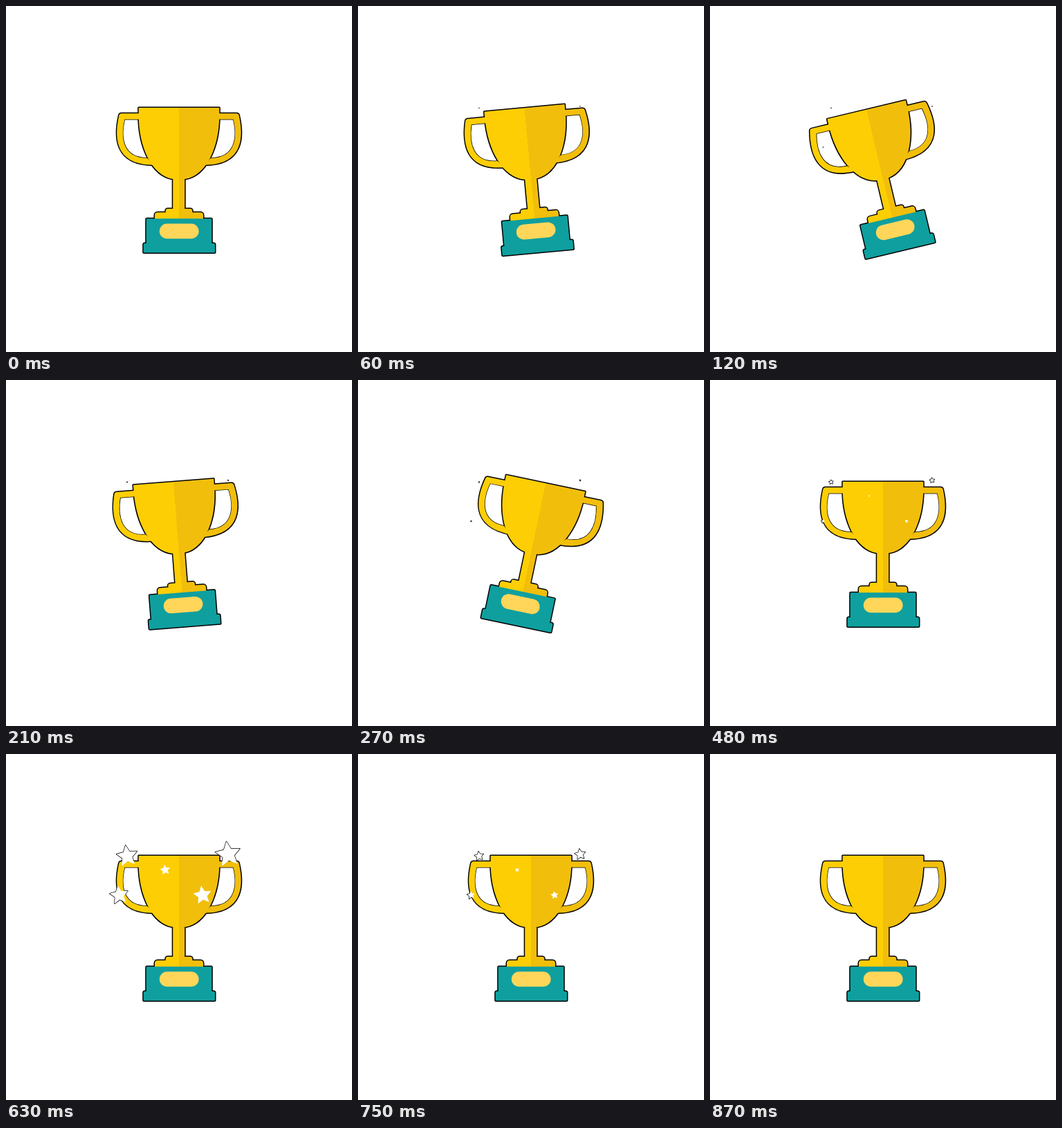
These frames come from a looping animation (500x500 px, 900 ms). An HTML page with a canvas:

```html
<!DOCTYPE html>
<html lang="en">
<head>
<meta charset="utf-8">
<title>Trophy</title>
<style>
  html, body { margin: 0; width: 100%; height: 100%; overflow: hidden; background: #fff; }
  canvas { display: block; width: 500px; height: 500px; }
</style>
</head>
<body>
<canvas id="stage" width="500" height="500"></canvas>
<script>
const ctx = document.getElementById('stage').getContext('2d');
const STEP = 30;
const STEPS = 30;
const TEAL = '#0f9f9f';
const BOLD = 3;
const FINE = 1.4;

// Gold with a hard light/shade split along the vertical axis
const gold = ctx.createLinearGradient(-100, 0, 100, 0);
gold.addColorStop(0, '#fdce04');
gold.addColorStop(0.5, '#fdce04');
gold.addColorStop(0.5, '#f1be0b');
gold.addColorStop(1, '#f1be0b');

function box(left, top, width, height, radii) {
  const path = new Path2D();
  path.roundRect(left, top, width, height, radii);
  return path;
}

function mirror(path) {
  const flipped = new Path2D();
  flipped.addPath(path, new DOMMatrix([-1, 0, 0, 1, 0, 0]));
  return flipped;
}

// All trophy coordinates are relative to its pivot, the stage centre
const cup = new Path2D(
  'M-58.3 -103 H58.3 V-92 C58.3 -47 40 -5 9 0 H-9 C-40 -5 -58.3 -47 -58.3 -92 Z');
const rimCurve = 'H-83 Q-86 -94.8 -86.6 -92 C-93.5 -62 -94 -20 -36 -20.3';
const holeCurve = 'C-81.5 -30.3 -85 -60 -78.5 -86.3 H-57';
const rim = new Path2D('M-57 -94.8' + rimCurve);
const hole = new Path2D('M-46 -30.3' + holeCurve);
const handle = new Path2D('M-57 -94.8' + rimCurve + 'L-46 -30.3' + holeCurve + 'Z');

const parts = [
  [cup, gold],
  [box(-8.8, -3, 17, 48, 0), gold],
  [box(-19.3, 43, 38.6, 10, [3, 3, 0, 0]), gold],
  [box(-35, 48.2, 70, 10, [4, 4, 0, 0]), gold],
  [box(-47.3, 57.3, 94.6, 40, 1), TEAL],
  [box(-51.3, 93, 103.3, 13.6, [2, 2, 1, 1]), TEAL],
];
const fills = [[handle, gold], [mirror(handle), gold], ...parts];
const outlines = [
  [rim, BOLD], [mirror(rim), BOLD],
  [hole, FINE], [mirror(hole), FINE],
  ...parts.map(([path]) => [path, BOLD]),
];
const plate = box(-28.2, 64.5, 56.8, 21.7, 10.8);

const stars = [
  { x: 175, y: 147.5, radius: 16.4 },
  { x: 321, y: 145, radius: 19.5 },
  { x: 163.5, y: 204, radius: 14.4 },
  { x: 230, y: 167.5, radius: 8 },
  { x: 284, y: 204, radius: 14.3 },
];

const smooth = p => p * p * (3 - 2 * p);

function tiltAt(step) {
  const angles = [0, -15, 15, 0];
  const leg = Math.floor(step / 5);
  if (leg >= 3) return 0;
  const p = smooth(step / 5 - leg);
  return (angles[leg] + (angles[leg + 1] - angles[leg]) * p) * Math.PI / 180;
}

// Long, slow build-up that bursts open, then a soft shrink
function starScaleAt(step) {
  if (step <= 20) {
    const u = 1 - Math.cbrt(1 - step / 20);
    return 1.2 * u * u * (1 - u) + u ** 3;
  }
  return 1 - smooth((step - 20) / 9);
}

function starPath({ x, y, radius }, scale) {
  const path = new Path2D();
  for (let i = 0; i < 10; i++) {
    const r = radius * scale * (i % 2 ? 0.48 : 1);
    const a = (i * 36 - 98) * Math.PI / 180;
    path.lineTo(x + r * Math.cos(a), y + r * Math.sin(a));
  }
  path.closePath();
  return path;
}

function drawTrophy(tilt) {
  ctx.save();
  ctx.translate(250, 250);
  ctx.rotate(tilt);
  for (const [path, width] of outlines) {
    ctx.lineWidth = width;
    ctx.stroke(path);
  }
  for (const [path, color] of fills) {
    ctx.fillStyle = color;
    ctx.fill(path);
  }
  ctx.fillStyle = '#ffd65a';
  ctx.fill(plate);
  ctx.restore();
}

function draw(step) {
  ctx.fillStyle = '#fff';
  ctx.fillRect(0, 0, 500, 500);
  ctx.strokeStyle = '#000';
  ctx.lineJoin = 'round';

  const scale = starScaleAt(step);
  const shapes = scale > 0 ? stars.map(star => starPath(star, scale)) : [];

  // Star outlines lie behind the trophy, their white faces in front
  ctx.lineWidth = FINE;
  for (const shape of shapes) ctx.stroke(shape);
  drawTrophy(tiltAt(step));
  ctx.fillStyle = '#fff';
  for (const shape of shapes) ctx.fill(shape);
}

function tick() {
  draw(Math.floor(performance.now() / STEP) % STEPS);
  requestAnimationFrame(tick);
}
tick();
</script>
</body>
</html>
```
